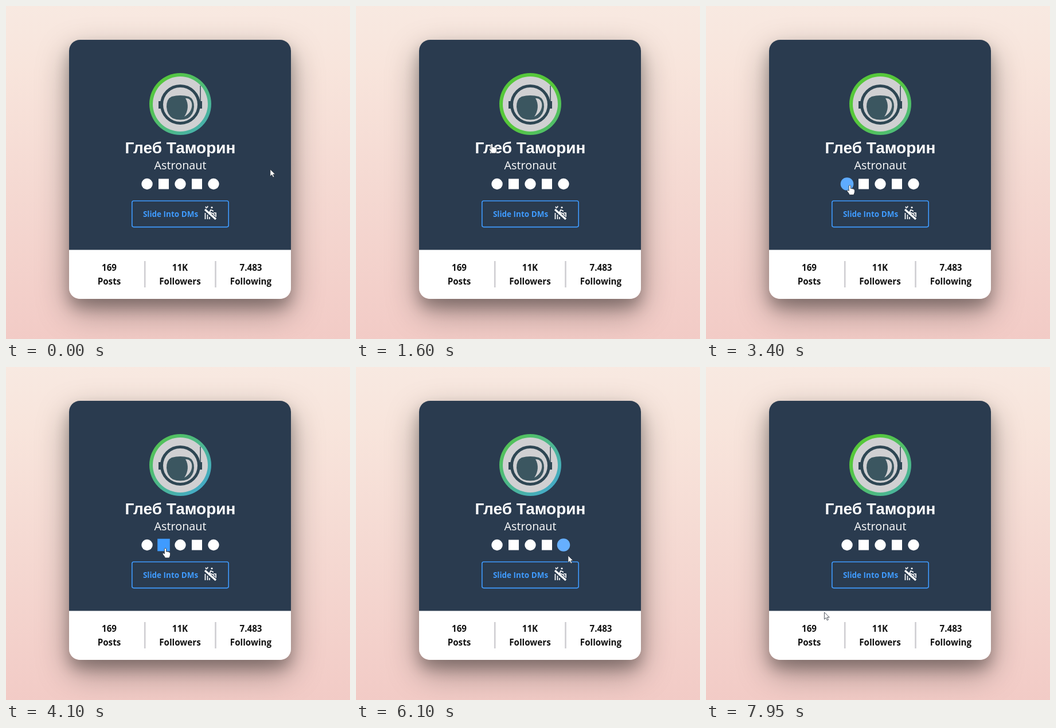
Write an HTML page that moves like this. It is 600 px wide and 581 px high and loops after 8000 ms.

```html
<!DOCTYPE html>
<html lang="en">
<head>
<meta charset="utf-8">
<style>
  html, body { margin: 0; width: 100%; height: 100%; overflow: hidden; }
  body { background: linear-gradient(#f8e9e1, #f8e5dc 18%, #f5d9d2 55%, #f2cbc6); }
  .card {
    position: absolute; left: 110px; top: 59px; width: 387px; height: 452px;
    border-radius: 19px;
    background: linear-gradient(#2a3b4f 366.3px, #fff 366.7px);
    box-shadow: 0 22px 56px rgba(0,0,0,.36), 0 15px 24px rgba(0,0,0,.24);
  }
  svg { position: absolute; left: 0; top: 0; }
  text { font-family: "Open Sans", sans-serif; text-anchor: middle; }
  .name { font: bold 28px "Liberation Sans", Arial, sans-serif; }
  .stats { font-size: 15.2px; font-weight: 700; fill: #111; }
</style>
</head>
<body>
<div class="card"></div>
<svg width="600" height="581" viewBox="0 0 600 581">
  <defs>
    <linearGradient id="ring" gradientUnits="userSpaceOnUse" x1="266" y1="133" x2="393" y2="260">
      <stop stop-color="#56c83a"/><stop offset="1" stop-color="#3fa2f2"/>
    </linearGradient>
  </defs>

  <circle cx="304" cy="171" r="54" fill="url(#ring)"/>
  <circle cx="304" cy="171" r="48" fill="#d0d0d2"/>
  <g fill="#2e4653">
    <circle cx="304" cy="172" r="32.5" fill="none" stroke="#2e4653" stroke-width="5"/>
    <rect x="266" y="166" width="7" height="13"/>
    <rect x="335" y="166" width="7" height="13"/>
    <path d="M338.3 139h1.5v28h-1.5z"/>
    <path fill="#3b5660" d="M289 158Q304 154 319 158Q328 162 328 176Q327 190 317 196Q304 201 291 196Q281 190 280 176Q280 162 289 158Z"/>
    <path fill="#d0d0d2" d="M313 161C328 160 329 184 311 193C318 183 319 171 313 161Z"/>
  </g>

  <g fill="#fff">
    <text class="name" x="304" y="257">Глеб Таморин</text>
    <text x="304" y="285" font-size="19.8">Astronaut</text>
  </g>
  <g id="icons"></g>

  <rect id="button" x="219.8" y="340" width="168.4" height="45.6" rx="3" stroke="#3f9bff" stroke-width="1.6"/>
  <text id="label" x="287" y="368" font-size="13.5" font-weight="700">Slide Into DMs</text>
  <g fill="none" stroke="#fff" stroke-width="1.7">
    <circle cx="359" cy="351.5" r="1.6" fill="#fff" stroke="none"/>
    <path d="M357.5 355l-2.5 5 6 2 3 4M358 356l4 2M348 350l2 3M352 349l-1 3"/>
    <path d="M347 355l19 17" stroke-width="3.4"/>
    <path d="M347.5 361v11M351.5 364v8M355 368v4M362 361h4v7"/>
  </g>

  <g id="stats" class="stats"></g>
  <path d="M242.2 445v46M365.5 445v46" stroke="#cfced2" stroke-width="2.6"/>

  <g id="cursor" fill="#fff" stroke="#222b36" stroke-width=".8" stroke-linejoin="round">
    <path id="arrow" d="M0 0V12.2L2.9 9.6L4.9 14L7 13L5 8.8H8.8Z"/>
    <path id="hand" d="M-1.7 1.2Q0-1 1.5 1.2V6.2Q3 5 4.2 6.5Q5.5 5.5 6.6 7.2Q8.4 6.8 8.4 9V12Q8 14.5 6.5 17H-.5Q-2 13.5-4.5 11Q-5.4 8.6-3.5 8.6L-1.7 10Z"/>
  </g>
</svg>
<script>
const LOOP = 8000, WHITE = [255, 255, 255], BLUE = [63, 155, 255];
const $ = id => document.getElementById(id);

// Key points of the pointer tip: [time, x, y]
const path = [
  [0, 461, 285], [1600, 237, 240], [2600, 277, 276], [3300, 247, 312], [4100, 278, 316],
  [5600, 360, 316], [6100, 370, 329], [7050, 306, 353], [LOOP, 201, 432]
];
// The pointer sweeps over the five icons at an even pace, then over the button.
const hovers = Array.from({ length: 5 }, (_, i) => [3150 + 590 * i, 3680 + 590 * i]);
const press = [6500, 7430];
const hands = [[1200, 1750], ...hovers, press];

const clamp = v => Math.max(0, Math.min(1, v));
const ramp = (t, [a, b], d = 300) => clamp((t - a) / d) - clamp((t - b) / d);
const lerp = (a, b, k) => a.map((v, i) => v + (b[i] - v) * k);
const mix = (a, b, k) => `rgb(${lerp(a, b, k)})`;

function pointer(t) {
  const i = path.findIndex(p => p[0] > t);
  const a = path[i - 1], b = path[i];
  return lerp(a, b, (t - a[0]) / (b[0] - a[0])).slice(1);
}

function add(parent, tag, attrs, text = "") {
  const el = document.createElementNS("http://www.w3.org/2000/svg", tag);
  for (const key in attrs) el.setAttribute(key, attrs[key]);
  el.textContent = text;
  return $(parent).appendChild(el);
}

["169 Posts", "11K Followers", "7.483 Following"].forEach((stat, i) =>
  stat.split(" ").forEach((line, j) =>
    add("stats", "text", { x: 180 + 123.5 * i, y: 462 + 23.5 * j }, line)));

const icons = hovers.map((_, i) => i % 2
  ? add("icons", "rect", { x: -9, y: -9, width: 18, height: 18 })
  : add("icons", "circle", { r: 9.7 }));

function draw(t) {
  // The ring colours slide back and forth every two seconds.
  const shift = -20 - 64 * Math.cos(Math.PI * (t - 600) / 1000);
  $("ring").setAttribute("gradientTransform", `translate(${shift} ${shift})`);

  icons.forEach((el, i) => {
    const k = ramp(t, hovers[i]);
    el.setAttribute("transform", `translate(${246 + 29 * i} 310.5) scale(${1 + .2 * k})`);
    el.setAttribute("fill", mix(WHITE, BLUE, k));
  });

  const k = ramp(t, press);
  $("button").setAttribute("fill", `rgba(${[...BLUE, k]})`);
  $("label").setAttribute("fill", mix(BLUE, WHITE, k));

  const hand = hands.some(([a, b]) => t >= a && t < b);
  $("cursor").setAttribute("transform", `translate(${pointer(t)})`);
  $("hand").style.display = hand ? "" : "none";
  $("arrow").style.display = hand ? "none" : "";
}

const start = performance.now();
function frame() {
  draw((performance.now() - start) % LOOP);
  requestAnimationFrame(frame);
}
frame();
</script>
</body>
</html>
```
